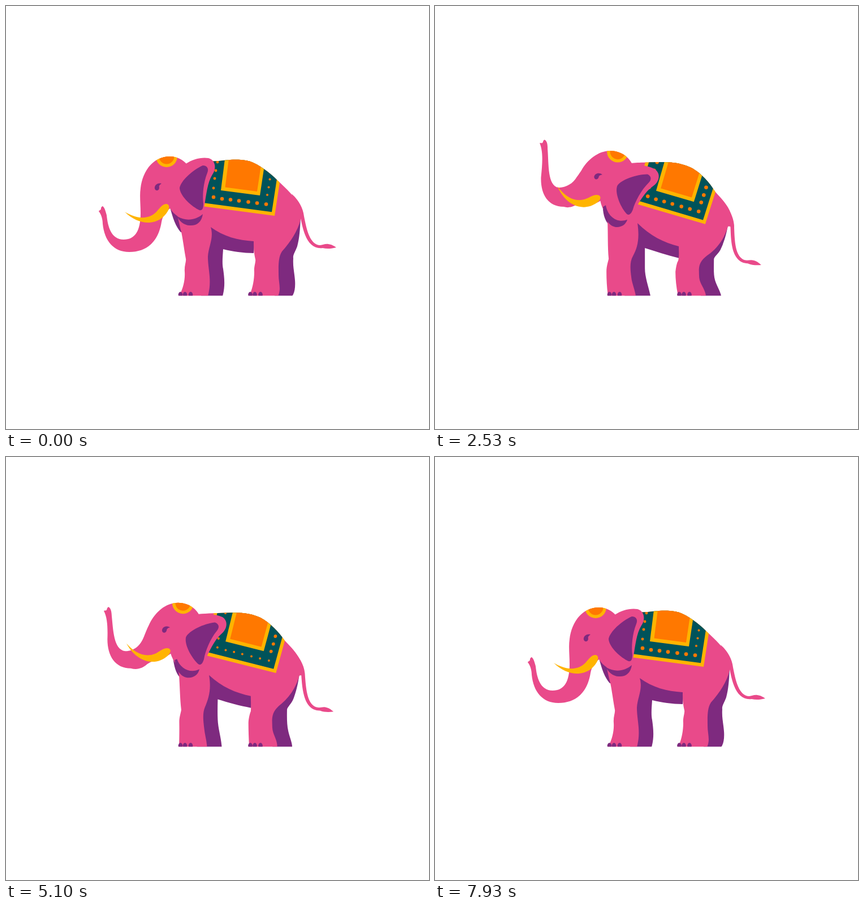
These frames come from a looping animation (748x748 px, 8010 ms). An HTML page:

```html
<!DOCTYPE html>
<html lang="en">
<head>
<meta charset="utf-8">
<title>Elephant</title>
<style>
  html, body { margin: 0; width: 100%; height: 100%; overflow: hidden; background: #fff; }
  svg { display: block; width: 100vw; height: 100vh; }
  .pink { fill: #e94a8a; }
  .plum { fill: #7e2a7f; }
  .gold { fill: #ffb400; }
  .orange { fill: #ff7800; }
  .teal { fill: #00535a; }
</style>
</head>
<body>
<svg viewBox="0 0 748 748">
  <defs>
    <clipPath id="ground"><rect width="748" height="512.3"/></clipPath>
    <clipPath id="bodyClip"><path data-shape="body"/></clipPath>
    <clipPath id="headClip"><path data-shape="head"/></clipPath>
  </defs>
  <g clip-path="url(#ground)">
    <path class="plum" data-shape="farFront"/>
    <path class="plum" data-shape="farRear"/>
    <path class="pink" data-turn="body" d="M505 332C516 342 525 355 527 372C532 398 537 416 550 422C558 425 562 420 570 421C577 422 581 425 584 427C576 429 568 430 560 428C545 430 535 420 529 405C524 392 522 380 520 370Z"/>
    <path class="plum" data-shape="chest"/>
    <path class="pink" data-shape="body"/>
    <g id="toes" class="plum"></g>
    <g clip-path="url(#bodyClip)">
      <g data-turn="body">
        <path class="gold" d="M355 268L343 353.5L475 371L492 260Z"/>
        <path class="teal" d="M361 268L350 348.2L470 364.3L486 260Z"/>
        <path class="gold" d="M389 255L380 326L449 335L461 255Z"/>
        <path class="orange" d="M396 255L387.5 320.5L444 328L455 255Z"/>
        <g id="dots" class="orange"></g>
      </g>
    </g>
    <g data-turn="head">
      <path class="pink" data-shape="head"/>
      <g clip-path="url(#headClip)">
        <circle class="gold" cx="284" cy="266" r="19"/>
        <circle class="orange" cx="284" cy="266" r="13.5"/>
      </g>
      <path class="plum" d="M275 314C268 312 262 317 263 323C265 328 271 327 271 321C270 318 272 316 275 314Z"/>
      <path class="gold" d="M210 364C228 375 250 380 266 364C273 356 277 350 284 350C290 351 289 358 286 363C270 390 235 389 210 364Z"/>
    </g>
    <path class="plum" data-shape="collar"/>
    <g data-turn="head">
      <path class="pink" d="M318 279C330 271 345 267 358 269C370 272 373 287 365 298C356 312 354 335 351 352C349 362 338 362 330 355C310 345 300 320 318 279Z"/>
      <path class="plum" d="M348 282C356 282 359 288 356 295C349 312 347 335 349 350C349 361 345 363 340 360C325 352 308 335 307 322C309 309 330 290 348 282Z"/>
    </g>
  </g>
</svg>
<script>
const LOOP = 8010, CYCLE = LOOP / 2;
const face = 'C241 295 258 266 290 266C303 266 314 273 319 279C335 272 340 300 345 340C350 372 335 378 322 378C310 378 298 370 290 358';

// Each shape: trunk lowered, trunk raised. The head pair is in head space.
const shapes = {
  farFront: [
    'M362 388L440 410L438 437C420 437 400 434 384 430C383 445 382 455 384 465C386 480 388 495 383 513L345 513L345 440Z',
    'M358 382L433 420L432 446C410 441 390 434 371 428C371 440 371 452 371 464C371 480 378 498 381 513L335 513L335 440Z'],
  farRear: [
    'M521 374C520 395 519 410 515 425C511 436 507 440 508 446C507 462 510 470 511 485C512 498 510 508 506 513L475 513L475 440Z',
    'M518 388C515 405 510 420 506 428C503 437 493 443 493 448C493 462 492 475 495 485C498 495 505 505 506 513L470 513L462 450Z'],
  chest: [
    'M290 356C295 375 300 390 309 400L318 400L318 360Z',
    'M296 345C297 360 297 372 305 384L316 386L316 350Z'],
  body: [
    'M330 277C350 275 370 275 385 273C405 271 425 271 437 277C455 285 472 300 484 312C500 327 520 345 525 372L521 377' +
    'C516 400 500 420 488 434C481 445 482 460 482 475C482 490 487 500 481 513L430 513' +
    'C436 500 439 485 439 470C438 462 442 452 441 448C438 435 438 425 438 416C410 414 385 408 362 391' +
    'C368 410 358 425 357 443C357 455 359 465 360 478C361 492 360 502 357 513L306 513' +
    'C313 500 317 485 316 470C315 460 319 452 318 447C314 425 312 405 308 392L303 370Z',
    'M345 278C355 277 380 276 404 276C424 276 442 280 455 287C472 297 485 312 496 329C507 342 525 356 529 390L518 390' +
    'C512 410 502 425 487 437C465 452 466 460 467 480C468 492 478 500 479 513L430 513' +
    'C427 500 425 485 425 470C426 462 427 455 430 450C432 442 431 434 431 425C405 419 380 406 358 384' +
    'C362 412 358 428 350 442C344 452 345 465 347 480C348 490 353 500 355 513L306 513' +
    'C304 500 303 485 303 470C303 460 306 452 307 447C305 425 306 405 305 380L304 365Z'],
  head: [
    'M171 354C174 356 176 362 178 370C180 390 186 413 208 413C228 413 238 398 238 366C238 350 236 335 238 322' + face +
    'C284 362 277 370 275 382C274 388 273 392 271 398C262 423 243 435 218 435C190 435 174 415 171 385' +
    'C171 376 168 368 164 363C166 360 168 362 168 357C169 355 170 354 171 354Z',
    'M157 296.8C161.5 297 165 302 168 309.6C180.6 333 193.4 370 213 365C225.8 359.4 233.6 347.3 235 335.7C236 331 237 327 238 322' + face +
    'C284.5 366.5 274.3 373.2 265 377C258 379 253 381 250 385C246 389 241 392 234.8 392.6C209 403.7 188.4 388.7 177.3 360.8' +
    'C169.3 335 162.3 316.3 151.1 305.8C152.6 304.1 156.5 305.7 155.5 300.7C155.3 298.5 156 297 157 296.8Z'],
  collar: [
    'M303 372C318 381 335 379 348 368C346 383 336 389 325 388C315 388 305 380 302 370Z',
    'M302 352C305 372 322 385 340 378C337 387 330 391 322 391C310 391 300 380 297 355Z']
};
const turns = { body: [9, '381 397'], head: [23.5, '324 357'] };

// Dot rows: points, mean radius, swing, time of largest size
const rows = [
  { at: [[374, 276], [371, 291], [369, 305], [367, 322]], size: 2.6, swing: 0.6, peak: 2800 },
  { at: [[367, 338], [382, 341], [397, 342.6], [412, 344.6], [428.5, 346.6], [444, 348.6], [460, 350.5]], size: 2.9, swing: 0.95, peak: 3250 },
  { at: [[462, 334], [464.5, 320.5], [466.5, 306.5]], size: 2.8, swing: 0.8, peak: 2000 }
];

const all = q => [...document.querySelectorAll(q)];
function add(parent, tag, attrs) {
  const el = document.createElementNS('http://www.w3.org/2000/svg', tag);
  for (const k in attrs) el.setAttribute(k, attrs[k]);
  document.getElementById(parent).append(el);
  return el;
}

for (const x of [308.5, 316.5, 326.5, 432, 440, 450])
  add('toes', 'ellipse', { cx: x, cy: 510.5, rx: 3.8, ry: 5 });
for (const row of rows)
  row.dots = row.at.map(([cx, cy]) => add('dots', 'circle', { cx, cy }));

const morphs = all('[data-shape]').map(el => {
  const [from, to] = shapes[el.dataset.shape];
  return { el, from, to: to.match(/[\d.]+/g) };
});
const turners = all('[data-turn]').map(el => ({ el, turn: turns[el.dataset.turn] }));

// Rises over 1500 ms, holds, then falls the same way
const RISE = 1500, TOP = 2015, REACH = 1915;
function lift(t) {
  const x = Math.min(1, Math.max(0, (REACH - Math.abs(t - TOP)) / RISE));
  return x * x * (3 - 2 * x);
}

function draw(time) {
  const t = time % CYCLE, p = lift(t);
  for (const { el, from, to } of morphs) {
    let i = 0;
    el.setAttribute('d', from.replace(/[\d.]+/g, v => (+v + (to[i++] - v) * p).toFixed(2)));
  }
  for (const { el, turn: [angle, pivot] } of turners)
    el.setAttribute('transform', `rotate(${angle * p} ${pivot})`);
  for (const { dots, size, swing, peak } of rows) {
    const r = size + swing * Math.cos((t - peak) / CYCLE * 2 * Math.PI);
    dots.forEach(dot => dot.setAttribute('r', r));
  }
}

const start = performance.now();
function tick() {
  draw((performance.now() - start) % LOOP);
  requestAnimationFrame(tick);
}
tick();
</script>
</body>
</html>
```
